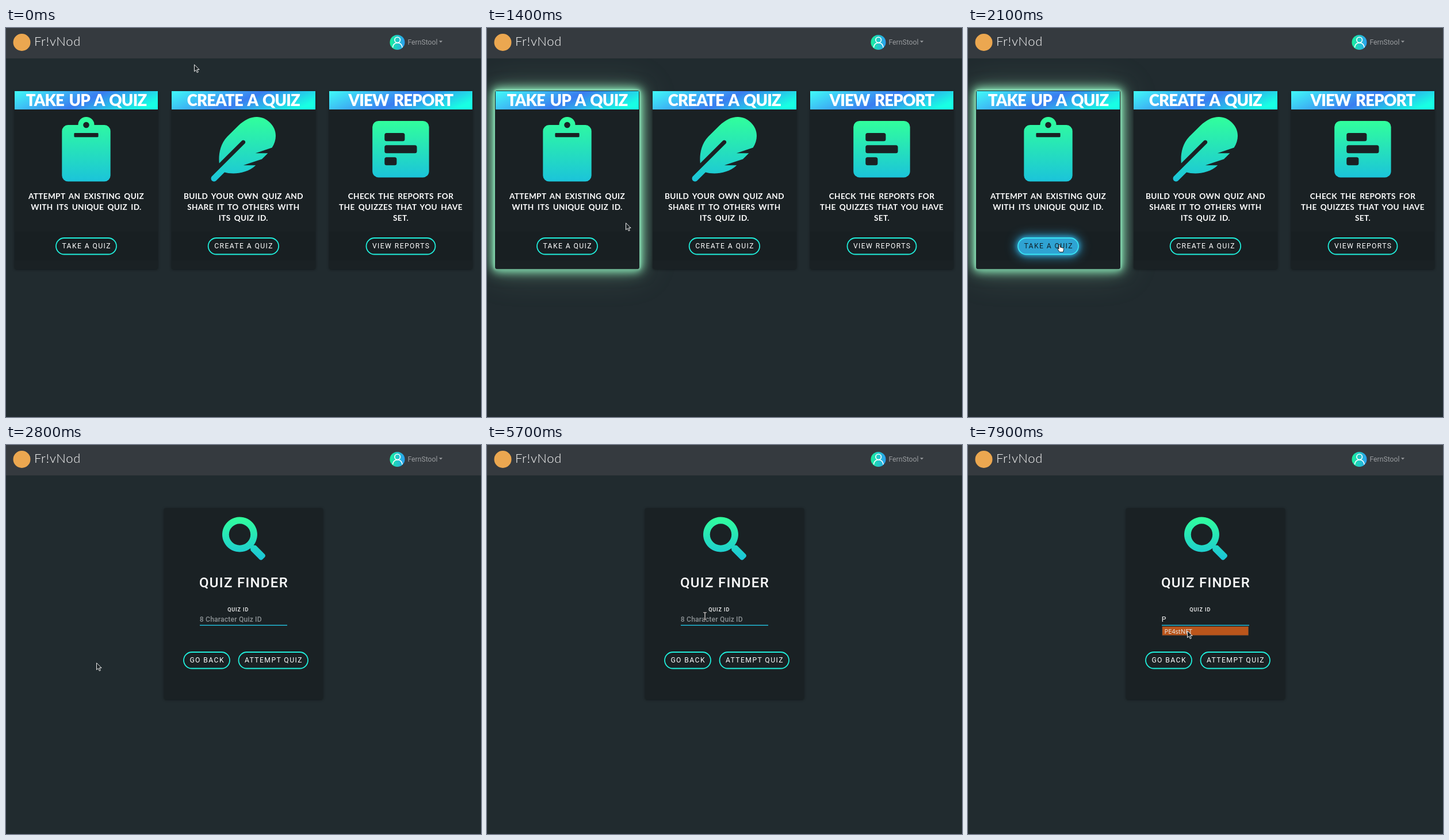
Write an HTML page that moves like this. It is 826 px wide and 678 px high and loops after 8000 ms.

```html
<!DOCTYPE html>
<html lang="en">
<head>
<meta charset="utf-8">
<title>Quiz menu</title>
<style>
html, body { margin: 0; width: 100%; height: 100%; overflow: hidden; background: #212b2f; }
svg { position: absolute; left: 0; top: 0; }
.card { position: absolute; background: #1a2124; border-radius: 3px; box-shadow: 0 1px 4px #0007; }
.card b { display: block; height: 32px; background: linear-gradient(155deg, #40fbf8, #3a7df0 50%, #18ffe4 90%); }
.card i { position: absolute; top: 245px; width: 100%; height: 50px; background: #0001; }
#glow { left: 14px; top: 109px; width: 251px; height: 311px; background: none; border-radius: 3px;
  box-shadow: 0 0 4px 1px #9fffd2, 0 0 16px 3px #8ff5c0, 0 0 26px 4px #8fe0b080, 0 0 60px 4px #9fd6ae40; }
text { fill: #fff; font: 400 12.2px Roboto, sans-serif; }
.mid text { text-anchor: middle; }
.mid .head { font: 900 27.5px Lato, sans-serif; letter-spacing: -.8px; word-spacing: 3px; }
.mid .body { font: 700 13.6px Lato, sans-serif; letter-spacing: .35px; word-spacing: 2.5px; }
.mid .title { font-size: 24px; font-weight: 500; letter-spacing: 1.3px; }
.mid .label { font-size: 9px; font-weight: 500; letter-spacing: .9px; }
.btn rect { fill: none; stroke: #20efdc; stroke-width: 1.8; }
.btn text { letter-spacing: 1.4px; }
.btn.hot rect { fill: #2fa3d3; stroke: #38e4f5; filter: drop-shadow(0 0 4px #2fa3d3) drop-shadow(0 0 9px #2fa3d3); }
.btn.hot text { fill: #10202a; }
.icon { fill: url(#mint); fill-rule: evenodd; }
.hole { fill: #1a2124; }
</style>
</head>
<body>
<div id="menuCards"><div class="card" id="glow"></div></div>
<div id="finderCard" class="card" style="left:275px;top:110px;width:276px;height:333px"></div>

<svg width="826" height="678" viewBox="0 0 826 678">
  <defs>
    <linearGradient id="mint" x2="0" y2="1"><stop stop-color="#31ff9c"/><stop offset="1" stop-color="#1bc4da"/></linearGradient>
    <linearGradient id="face"><stop stop-color="#18f29c"/><stop offset="1" stop-color="#2b9df2"/></linearGradient>
  </defs>

  <rect width="826" height="53" fill="#353a3f"/>
  <circle cx="27.5" cy="25" r="15" fill="#eba750"/>
  <text x="49" y="31" style="font:300 22px Lato,sans-serif;letter-spacing:.7px">Fr!vNod</text>
  <circle cx="680.5" cy="25" r="13" fill="url(#face)"/>
  <g fill="none" stroke="#fff" stroke-width="1.6">
    <circle cx="680.7" cy="20.8" r="4.8"/><path d="M672.5 34c0-11 16.5-11 16.5 0"/>
  </g>
  <text x="698.5" y="28.5" style="fill:#999c9f">FernStool</text>
  <path d="M753 22.3h6l-3 3.2z" fill="#999c9f"/>

  <g id="menu" class="mid">
    <g class="icon" transform="translate(97.3 155) scale(.2197)">
      <path d="M48 64h80a64 64 0 0 1 128 0h80a48 48 0 0 1 48 48v352a48 48 0 0 1-48 48H48a48 48 0 0 1-48-48V112a48 48 0 0 1 48-48z"/>
      <circle class="hole" cx="192" cy="64" r="24"/>
      <rect class="hole" x="96" y="128" width="192" height="32" rx="6"/>
    </g>
    <path class="icon" transform="translate(356.5 155) scale(.2197)" d="M467 45c-62-63-161-65-252 26l-86 85c-60 61-70 151-64 211l179-178c6-6 16-6 23 0s6 17 0 23L7 471c-9 9-9 25 0 34s25 9 34 0l66-66c52 16 172 18 247-55h-98l147-49 47-47h-98l131-44c46-74 35-149-16-199z"/>
    <g class="icon" transform="translate(637.2 155) scale(.2197)">
      <rect y="32" width="448" height="448" rx="48"/>
      <g class="hole">
        <rect x="96" y="128" width="160" height="64" rx="16"/>
        <rect x="96" y="224" width="256" height="64" rx="16"/>
        <rect x="96" y="320" width="96" height="64" rx="16"/>
      </g>
    </g>
  </g>

  <g id="finder">
    <path class="icon" transform="translate(376 125.5) scale(.1465)" d="M505 443l-100-100c-4-4-10-7-17-7h-16a208 208 0 1 0-36 36v16c0 7 3 13 7 17l100 100c9 9 25 9 34 0l28-28c9-9 9-25 0-34zM208 336a128 128 0 1 1 0-256 128 128 0 0 1 0 256z"/>
    <g class="mid" id="form">
      <text class="title" x="413.5" y="248">QUIZ FINDER</text>
      <text class="label" x="403.7" y="289.5">QUIZ ID</text>
    </g>
    <text id="field" x="336.8" y="308.3"></text>
    <path d="M337 314.3h152" stroke="#22b9d6" stroke-width="1.6"/>
    <rect id="caret" y="297" width="1" height="14" fill="#eee"/>
    <g id="list">
      <rect x="337" y="316" width="151" height="16.5" fill="#33332f"/>
      <rect id="pick" x="338" y="316.5" width="149.5" height="15" fill="#ba551b"/>
      <text x="341.5" y="328.5" style="font:11px 'Noto Sans',sans-serif;fill:#e6e6e2">PE4stNFT</text>
    </g>
  </g>

  <g id="cursor" stroke-linejoin="round">
    <path id="arrow" d="M.5.8v12l2.8-2.5 2 4.4 2-.9-2-4.3h3.8z" fill="#1c2326" stroke="#eee"/>
    <path id="hand" d="M3 1c1-1 2.3-.5 2.3 1v3l4.7 1.2c1 .3 1.5 1 1.5 2L10.5 13.5h-6L1 9c-.6-1.3.8-2 2-.8z" fill="#fff" stroke="#111" stroke-width=".9"/>
    <g id="beam" fill="none">
      <path d="M-3-6h6M-3 6h6M0-6V6" stroke="#111" stroke-width="3"/>
      <path d="M-3-6h6M-3 6h6M0-6V6" stroke="#eee" stroke-width="1.2"/>
    </g>
  </g>
</svg>

<script>
const $ = id => document.getElementById(id);
const show = (id, on) => { $(id).style.visibility = on ? 'visible' : 'hidden'; };
const label = (x, y, cls, s) => `<text class="${cls}" x="${x}" y="${y}">${s}</text>`;
const button = (x, y, w, s) => `<g class="btn"><rect x="${x + 1}" y="${y + 1}" width="${w - 2}" height="28.5" rx="14.25"/>` +
  label(x + w / 2 + .7, y + 19.3, '', s) + '</g>';

const cards = [
  [14.6, 'TAKE UP A QUIZ', ['ATTEMPT AN EXISTING QUIZ', 'WITH ITS UNIQUE QUIZ ID.'], 'TAKE A QUIZ', 107],
  [288, 'CREATE A QUIZ', ['BUILD YOUR OWN QUIZ AND', 'SHARE IT TO OTHERS WITH', 'ITS QUIZ ID.'], 'CREATE A QUIZ', 124.5],
  [561.6, 'VIEW REPORT', ['CHECK THE REPORTS FOR', 'THE QUIZZES THAT YOU HAVE', 'SET.'], 'VIEW REPORTS', 122]
];
for (const [x, head, lines, action, w] of cards) {
  const mid = x + 124.9;
  $('menuCards').insertAdjacentHTML('beforeend',
    `<div class="card" style="left:${x}px;top:110px;width:249.6px;height:310px"><b></b><i></i></div>`);
  $('menu').insertAdjacentHTML('beforeend', label(mid, 136.3, 'head', head) +
    lines.map((s, i) => label(mid, 297.6 + i * 19, 'body', s)).join('') +
    button(mid - w / 2, 365, w, action));
}
$('form').insertAdjacentHTML('beforeend', button(308, 360, 82, 'GO BACK') + button(403.5, 360, 122.5, 'ATTEMPT QUIZ'));
const takeButton = document.querySelector('#menu .btn');

// Pointer path: time, x, y
const path = [
  [0, 327, 63], [1100, 327, 63], [1200, 344, 150], [1300, 290, 262], [1400, 241, 339], [2000, 250, 354],
  [2100, 155, 377], [2700, 155, 377], [2800, 157, 379], [3400, 157, 379], [4000, 395, 296], [4100, 395, 296],
  [4500, 379, 298], [6300, 379, 298], [6400, 379, 297], [7300, 379, 297], [7600, 381, 323], [8000, 381, 323]
];
function pointer(t) {
  const i = path.findIndex(p => p[0] > t);
  const [t0, x0, y0] = path[i - 1], [t1, x1, y1] = path[i];
  const k = (t - t0) / (t1 - t0);
  return [x0 + (x1 - x0) * k, y0 + (y1 - y0) * k];
}

function draw(now) {
  const t = Math.floor(now % 8000 / 100) * 100;   // the screen updates ten times a second
  const within = (a, b) => t >= a && t < b;
  const menu = t < 2800, typed = t >= 6200;

  for (const id of ['menuCards', 'menu']) show(id, menu);
  for (const id of ['finderCard', 'finder']) show(id, !menu);
  show('glow', menu && t >= 1300);
  $('glow').style.opacity = t < 1400 ? .5 : 1;
  takeButton.classList.toggle('hot', t >= 2100);

  $('field').textContent = typed ? 'P' : '8 Character Quiz ID';
  $('field').style.cssText = typed ? 'fill:#fff' : 'fill:#8b9194;font-weight:500;letter-spacing:.15px';
  $('caret').setAttribute('x', typed ? 345 : 337);
  show('caret', within(4500, 5700) || within(6200, 6900));
  show('list', t >= 6300);
  show('pick', t >= 7500);

  const hand = within(2100, 2800), beam = within(3900, 6400);
  show('hand', hand);
  show('beam', beam);
  show('arrow', !hand && !beam);
  $('cursor').setAttribute('transform', `translate(${pointer(t)})`);
}

const start = performance.now();
function tick() {
  draw(performance.now() - start);
  requestAnimationFrame(tick);
}
tick();
</script>
</body>
</html>
```
